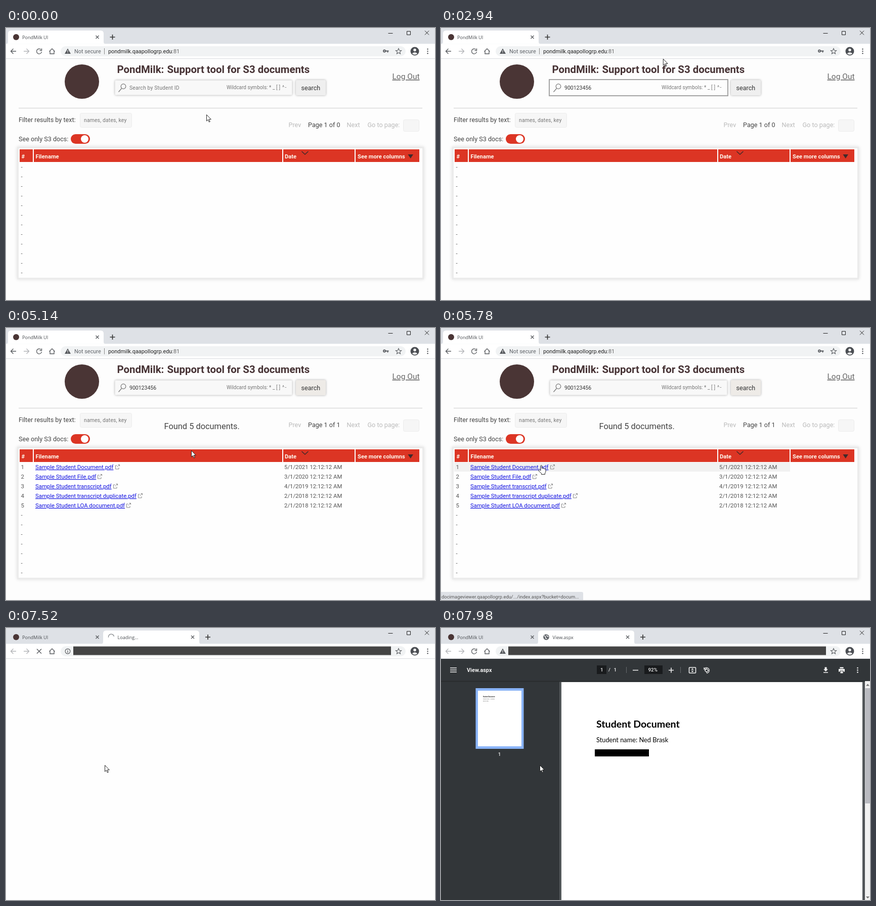
An HTML page that plays this animation: 848x538 px, repeating every 8000 ms.

```html
<!DOCTYPE html>
<html lang="en">
<head>
<meta charset="utf-8">
<title>PondMilk UI</title>
<style>
html, body { margin: 0; width: 100%; height: 100%; overflow: hidden; background: #fff; }
svg { display: block; width: 848px; height: 538px; font: 12.6px Roboto, sans-serif; fill: #444; }
.ui { font: 9.1px "Open Sans", sans-serif; fill: #4a4d51; }
.line { fill: none; stroke: #5a5d61; stroke-width: 1.4; }
.thin { fill: none; stroke: #222; stroke-width: 1; }
.pale { stroke: #b4b6b9; }
.red { fill: #dc3524; }
.head { font-weight: 700; font-size: 11.2px; fill: #fff8ee; }
.row { font-size: 11.35px; fill: #555; }
.link { fill: #1111e0; text-decoration: underline; }
.hint { font-size: 10.4px; letter-spacing: .15px; fill: #777; }
.soft { fill: #bbb; }
.soft-box { fill: #f6f6f6; stroke: #ececec; }
.glow { filter: drop-shadow(0 0 2px #aaa); }
.lit { fill: none; stroke: #f1f1f1; stroke-width: 1.6; }
.pdf { font-weight: 500; font-size: 9.8px; fill: #f1f1f1; }
.doc { font-family: Lato, sans-serif; fill: #000; }
</style>
</head>
<body>
<svg viewBox="0 0 848 538">
  <rect width="848" height="538" fill="#fdfdfd"/>

  <g id="page">
    <circle cx="150" cy="106" r="34" fill="#4a3535"/>
    <g font-size="20.4" font-weight="700" fill="#463234">
      <text x="219.500" y="89">PondMilk:</text>
      <text x="318.500" y="89">Support tool for S3 documents</text>
    </g>
    <text x="763.500" y="101" font-size="15.5" fill="#666" text-decoration="underline">Log Out</text>

    <rect id="field" class="glow" x="215.500" y="103.500" width="350" height="29" rx="2" fill="#f8f8f8"/>
    <rect id="focus" x="214" y="102" width="353" height="32" fill="#fdfdfd" stroke="#a3a3a3" stroke-width="2"/>
    <g class="line" style="stroke:#777;stroke-width:1.2"><circle cx="232" cy="115.500" r="4.800"/><path d="M228.500 119.500L222.500 126.500"/></g>
    <text id="holder" class="hint" x="244" y="122">Search by Student ID</text>
    <text id="typed" x="244" y="122" font-size="10.5" fill="#333"></text>
    <path id="caret" d="M0 112V124" stroke="#222"/>
    <g font-size="10" fill="#777">
      <text x="436" y="121">Wildcard symbols:</text>
      <text x="520 527 534 539.500 546 551.500" y="121">*_[]^-</text>
    </g>
    <rect id="button" x="573" y="103" width="59" height="30" rx="2"/>
    <text x="583.500" y="122.500" fill="#333">search</text>

    <path d="M25 158.500H823" stroke="#dadada" stroke-width="1.500"/>
    <text x="25" y="186">Filter results by text:</text>
    <rect class="soft-box" x="146.500" y="168.500" width="102" height="28" rx="3"/>
    <text class="hint" x="154" y="186">names, dates, key</text>
    <text id="found" x="312.500" y="199.500" font-size="16.4">Found 5 documents.</text>
    <text class="soft" x="558.500" y="196">Prev</text>
    <text id="pages" x="597" y="196"></text>
    <text class="soft" x="673.500" y="196">Next</text>
    <text class="soft" x="714.500" y="196">Go to page:</text>
    <rect class="soft-box" x="785.500" y="181.500" width="31" height="23" rx="3"/>
    <text x="25" y="223.500">See only S3 docs:</text>
    <rect class="red" x="128" y="210" width="38" height="19" rx="9.500"/>
    <circle cx="155.500" cy="219.500" r="7.500" fill="#fff"/>

    <rect x="23.500" y="236.500" width="801" height="259" fill="#fefefe" stroke="#ebebeb" stroke-width="3" style="filter:drop-shadow(0 0 3px #ddd)"/>
    <path class="red" d="M27 240H53V265H27zM55 240H546V265H55zM548 240H689V265H548zM691 240H817V265H691z"/>
    <g class="head">
      <text x="30.500" y="258">#</text><text x="58.500" y="258">Filename</text>
      <text x="551" y="258">Date</text><text x="695" y="258">See more columns</text>
    </g>
    <path d="M584.500 244L591 250L597.500 244" class="line" style="stroke:#402a2a"/>
    <path d="M794.500 250H805L799.700 258z" fill="#402a2a"/>
    <rect id="hover" x="26" y="266" width="664" height="18" fill="#f1f1f1"/>
    <g id="rows" class="row"></g>
    <g id="status">
      <path d="M0 522H278Q281 522 281 525V538H0z" fill="#dee1e6"/>
      <text x="1" y="535" font-size="9.4" fill="#555">docimageviewer.qaapollogrp.edu/.../index.aspx?bucket=docum...</text>
    </g>
  </g>

  <g id="loader" class="red"><circle cx="415" cy="326"/><circle cy="326" r="3.300"/><circle cy="326" r="3.300"/><circle cx="450" cy="326"/></g>

  <rect id="blank" y="60" width="848" height="478" fill="#fefefe"/>
  <rect id="dark" y="61" width="848" height="477" fill="#525659"/>

  <g id="viewer">
    <rect x="238" y="107" width="595" height="431" fill="#fff"/>
    <g class="doc">
      <text x="307" y="197" font-size="19.6" font-weight="700">Student Document</text>
      <text x="307" y="226" font-size="12.8">Student name: Ned Brask</text>
      <rect x="304" y="240" width="107" height="14"/>
    </g>
    <rect x="838" y="105" width="10" height="433" fill="#f1f1f1"/>
    <rect x="838.500" y="119" width="9.500" height="228" fill="#b9bac0"/>
    <path d="M840 114.500H847L843.500 110.500zM840 531H847L843.500 535z" fill="#777"/>
  </g>
  <g id="side">
    <rect y="61" width="234" height="477" fill="#323639"/>
    <rect x="68.500" y="119" width="95" height="120" fill="#8ab4f8"/>
    <rect x="73" y="124" width="86" height="110" fill="#fff"/>
    <g class="doc" font-size="2.1"><text x="83" y="136.500" font-size="2.8" font-weight="700">Student Document</text><text x="83" y="140.800">Student name: Ned Brask</text><text x="83" y="144.600">Record copy</text></g>
    <text class="pdf" x="112.800" y="252.500">1</text>
  </g>
  <g id="tools">
    <rect y="61" width="848" height="44" fill="#323639"/>
    <rect y="104.500" width="838" height="2" fill="#292c2e"/>
    <path class="lit" d="M18 79H31M18 83H31M18 87H31" stroke-width="2"/>
    <text class="pdf" x="51" y="87" style="font-weight:700;font-size:10.9px">View.aspx</text>
    <path d="M308 74H327V91H308zM402 74H438V91H402z" fill="#191b1d"/>
    <g class="pdf"><text x="315" y="86">1</text><text x="331" y="86">/</text><text x="341.500" y="86">1</text><text x="409.500" y="86">92%</text></g>
    <path d="M366.500 77V89M473.500 77V89" stroke="#666a6d"/>
    <path class="lit" d="M379 83.500H390M450 83.500H460M455 78.500V88.500"/>
    <rect class="lit" x="490.500" y="78" width="13" height="11" rx="1"/>
    <path d="M497 79.500L499.500 82.500H494.500zM497 87.500L499.500 84.500H494.500z" fill="#f1f1f1"/>
    <path class="lit" d="M525 80.500L528.500 84L525 87.500L521.500 84zM521 80A5.500 5.500 0 1 1 525 89.500M520 78V81.500H523.500" style="stroke-width:1.300"/>
    <path d="M758.500 77.500H762.500V81.500H765L760.500 86L756 81.500H758.500zM756 87.300H765V88.800H756zM788.500 77.500H795.500V80H788.500zM786 81H798V86.500H795.500V84.500H788.500V86.500H786zM789.500 85.500H794.500V89.500H789.500z" fill="#f1f1f1"/>
    <g fill="#f1f1f1"><circle cx="823.500" cy="79" r="1.300"/><circle cx="823.500" cy="83.300" r="1.300"/><circle cx="823.500" cy="87.600" r="1.300"/></g>
  </g>

  <!-- browser frame -->
  <rect width="848" height="31.500" fill="#dee1e6"/>
  <rect y="31.500" width="848" height="29" fill="#fff"/>
  <path d="M0 60.500H848" stroke="#dadce0"/>
  <path id="tab1" d="M0 31.500Q4 31.500 4 27.500V11Q4 5 10 5H187Q193 5 193 11V27.500Q193 31.500 197 31.500z" fill="#fff"/>
  <circle cx="20" cy="18" r="6" fill="#4a3535"/>
  <text class="ui" x="32" y="21.500">PondMilk UI</text>
  <path class="line" d="M177.500 15L183.500 21M183.500 15L177.500 21"/>
  <g id="tab2">
    <path id="shape2" fill="#fff"/>
    <path id="spin" class="line" d="M-5.500 .5A5.500 5.500 0 0 1 5.500 -1.200" style="stroke:#8b8e92"/>
    <g id="globe"><circle cx="208" cy="18" r="5.800" fill="#5f6368"/><path d="M204 15.500Q207 16 206.500 18.500T209.500 21M209.500 13.500Q208 16.500 212.500 17" class="line" style="stroke:#fff"/></g>
    <text id="title2" class="ui" x="220.500" y="21.500"></text>
    <path id="close2" class="line" d="M-3 15L3 21M3 15L-3 21"/>
  </g>
  <path id="plus" class="line" d="M-5 18H5M0 13V23" style="stroke:#333;stroke-width:1.600"/>
  <path class="thin" d="M755.500 10.500H764.500M792.500 6.500H799.500V13.500H792.500zM828 5.500L836 13.500M836 5.500L828 13.500"/>
  <path id="back" class="line" d="M20 46H10M14.500 41L9.500 46L14.500 51"/>
  <path class="line pale" d="M35 46H45M40.500 41L45.500 46L40.500 51"/>
  <path id="reload" class="line" d="M69 42.500A5 5 0 1 0 70.500 47M70.500 40.500V44.500H66.500"/>
  <path id="stop" class="line" d="M61 41.500L70 50.500M70 41.500L61 50.500"/>
  <path class="line" d="M85.500 46.500L91 41L96.500 46.500M87 45.500V51H95V45.500"/>
  <rect x="108" y="36" width="682" height="20" rx="10" fill="#f1f3f4"/>
  <g id="warn"><path d="M122 40.500L128 51H116z" fill="#55585c"/><path d="M122 44V47.200M122 48.300V49.600" stroke="#fff" stroke-width="1.200"/></g>
  <g id="info"><circle class="line" cx="122" cy="46" r="4.900" style="stroke-width:1.200"/><path d="M122 43V44.300M122 45.300V49" stroke="#55585c" stroke-width="1.300"/></g>
  <g id="url">
    <g font-size="10.9"><text x="135" y="50" fill="#5f6368">Not secure</text><text x="202" y="50" fill="#222">pondmilk.qaapollogrp.edu<tspan fill="#666">:81</tspan></text></g>
    <path d="M194.500 40V52" stroke="#888"/>
    <g class="line" style="stroke-width:1.800"><circle cx="748" cy="45.500" r="2"/><path d="M750 45.500H756.500M754.500 45.500V48.500"/></g>
  </g>
  <rect id="bar" x="133" y="36.500" width="628" height="17"/>
  <path class="line" style="stroke-width:1.100" d="M776 40.500L777.600 44.300L781.600 44.600L778.500 47.200L779.500 51L776 48.900L772.500 51L773.500 47.200L770.400 44.600L774.400 44.300z"/>
  <circle cx="808" cy="46" r="8.500" fill="#4b4e53"/>
  <path d="M802.800 50.500Q808 46 813.200 50.500Q808 55 802.800 50.500z" fill="#fff"/><circle cx="808" cy="43.500" r="2.700" fill="#fff"/>
  <g fill="#55585c"><circle cx="833.500" cy="41.800" r="1.200"/><circle cx="833.500" cy="46" r="1.200"/><circle cx="833.500" cy="50.200" r="1.200"/></g>

  <g id="mouse">
    <path id="arrow" d="M.5 .5V13L3.400 10.300L5.400 15L7.300 14.200L5.300 9.700H9.300z" fill="#fff" stroke="#111" stroke-width=".9"/>
    <path id="beam" class="thin" d="M-3 -6.500H-1L0 -5.800L1 -6.500H3M0 -5.800V5.800M-3 6.500H-1L0 5.800L1 6.500H3" style="stroke-width:1.200"/>
    <path id="hand" d="M2 9.500V1.500Q3.200 -.5 4.500 1.500V6.500Q6 5.500 7 7Q8.500 6 9.500 7.700Q11.500 7 12 9V13Q11.500 15 10.500 16V18.500H3.500V16.500L-2 11.500Q-2 8.500 .5 9.800L2 11z" fill="#fff" stroke="#111" stroke-width=".9"/>
  </g>
</svg>
<script>
const $ = id => document.getElementById(id);
const show = (id, on) => $(id).style.display = on ? "" : "none";
const move = (id, x, y, turn = 0) => $(id).setAttribute("transform", `translate(${x} ${y}) rotate(${turn})`);
const part = (t, a, b) => Math.min(1, Math.max(0, (t - a) / (b - a)));
const ease = p => p * p * (3 - 2 * p);

const files = ["Document", "File", "transcript", "transcript duplicate", "LOA document"];
const linkEnds = [213, 178, 209, 258, 235];
const dates = ["5/1/2021", "3/1/2020", "4/1/2019", "2/1/2018", "2/1/2018"];
const keyTimes = [1120, 1380, 1465, 1550, 1635, 1720, 1880, 2020, 2200];

let rows = "";
for (let i = 0; i < 12; i++) {
  const y = 279 + i * 19, x = linkEnds[i] + 3.5;
  const dash = `<text x="29.500" y="${y}">-</text>`;
  rows += i > 4 ? dash : `<g class="empty">${dash}</g><g class="full">
    <text x="29.500" y="${y}">${i + 1}</text>
    <text class="link" x="58" y="${y}">Sample Student ${files[i]}.pdf</text>
    <path class="line" style="stroke:#888;stroke-width:1" d="M${x + 3} ${y - 7}H${x}V${y}H${x + 6.5}V${y - 3}M${x + 3} ${y - 4}L${x + 8} ${y - 8.5}M${x + 5} ${y - 8.5}H${x + 8}V${y - 5.5}"/>
    <text x="550" y="${y}">${dates[i]} 12:12:12 AM</text></g>`;
}
$("rows").innerHTML = rows;

// Each leg: start, end, target x, y and upward bow
const legs = [
  [140, 700, 376, 123, 0], [2720, 3340, 592, 113, 72],
  [4580, 5140, 366, 242, 0], [5140, 5380, 215, 257, 0], [5400, 5740, 195, 271, 0]
];
function pointer(t) {
  let x = 396, y = 171;
  for (const [a, b, tx, ty, bow] of legs) {
    const p = ease(part(t, a, b));
    x += (tx - x) * p;
    y += (ty - y) * p - 4 * bow * p * (1 - p);
  }
  return [x, y];
}

// Curve of cubic-bezier(0, 1, 1, 0)
function snap(x) {
  let lo = 0, hi = 1;
  for (let i = 0; i < 20; i++) {
    const s = (lo + hi) / 2;
    if (s * s * (3 - 2 * s) < x) lo = s; else hi = s;
  }
  return 3 * lo * (1 - lo) ** 2 + lo ** 3;
}

function drawLoader(t) {
  const p = snap((t - 3600) / 130 % 1), [a, b, c, d] = $("loader").children;
  a.setAttribute("r", 3.3 * p);
  b.setAttribute("cx", 415 + 17.5 * p);
  c.setAttribute("cx", 432.5 + 17.5 * p);
  d.setAttribute("r", 3.3 * (1 - p));
}

function draw(t) {
  const [x, y] = pointer(t);
  const opened = t >= 5980, waiting = opened && t < 7560, done = t >= 4040;
  const inField = x > 215 && x < 566 && y > 103 && y < 133;
  const onButton = x > 572 && x < 633 && y > 102 && y < 134;
  const onRow = !opened && done && y > 266;
  const kind = opened ? "arrow" : onButton || onRow ? "hand" : inField ? "beam" : "arrow";
  for (const k of ["arrow", "beam", "hand"]) show(k, k === kind);
  move("mouse", x, y);

  const count = keyTimes.filter(k => t >= k).length;
  const focused = t >= 680 && t < 3600;
  show("focus", focused);
  show("field", !focused);
  show("holder", !count);
  $("typed").textContent = "900123456".slice(0, count);
  show("caret", focused && t < 2720);
  move("caret", 244.5 + count * 5.9, 0);

  const button = $("button");
  button.setAttribute("fill", onButton ? "#d3cfc9" : done ? "#eeebe7" : "#efefef");
  button.setAttribute("class", onButton ? "" : "glow");

  show("loader", t >= 3600 && !done);
  drawLoader(t);
  show("found", done);
  $("pages").textContent = "Page 1 of " + (done ? 1 : 0);
  document.querySelectorAll(".empty").forEach(e => e.style.display = done ? "none" : "");
  document.querySelectorAll(".full").forEach(e => e.style.display = done ? "" : "none");
  show("hover", onRow);
  show("status", onRow && t >= 5700);

  const right = 382 - 150 * (1 - ease(part(t, 5980, 6140)));
  show("tab1", !opened);
  show("tab2", opened);
  $("shape2").setAttribute("d", `M188 31.500Q192 31.500 192 27.500V11Q192 5 198 5H${right - 6}Q${right} 5 ${right} 11V27.500Q${right} 31.500 ${right + 4} 31.500z`);
  move("close2", right - 13, 0);
  move("plus", opened ? right + 17 : 210.5, 0);
  show("spin", waiting);
  move("spin", 208, 18, (7520 - t) * 360 / 660);
  show("globe", t >= 7560);
  $("title2").textContent = right < 300 ? "" : t < 7840 ? "Loading..." : "View.aspx";
  $("back").setAttribute("class", opened ? "line pale" : "line");
  show("reload", !waiting);
  show("stop", waiting);
  show("info", waiting);
  show("warn", !waiting);
  show("url", !opened);
  show("bar", t >= 6040);

  show("blank", opened);
  show("dark", t >= 7560);
  show("tools", t >= 7840);
  show("side", t >= 7880);
  show("viewer", t >= 7900);
}

function tick() {
  draw(performance.now() % 8000);
  requestAnimationFrame(tick);
}
tick();
</script>
</body>
</html>
```
